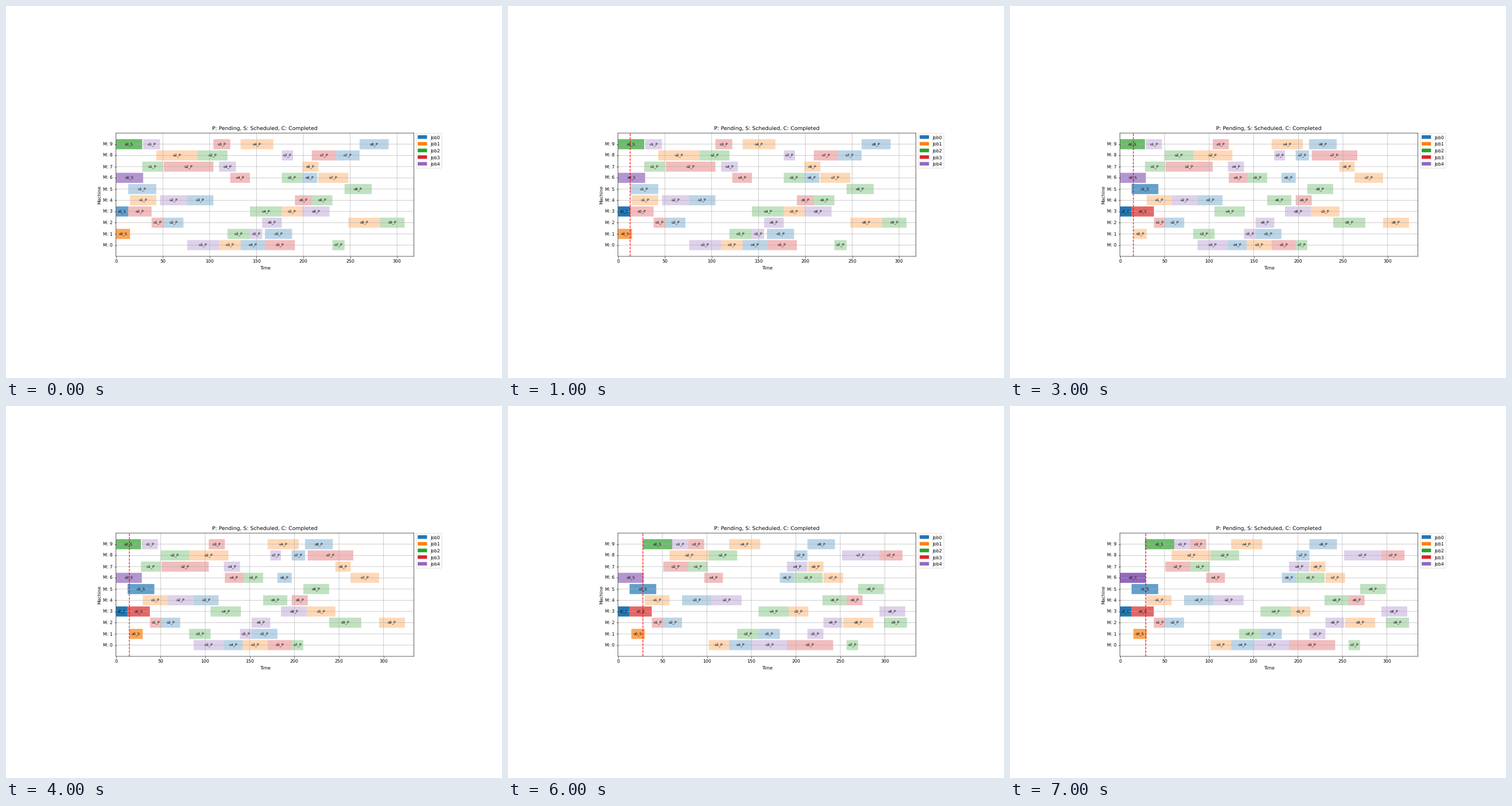
A matplotlib script that plays this animation: 864 px wide and 648 px high, repeating every 8000 ms.

```python
import matplotlib.pyplot as plt
from matplotlib.animation import FuncAnimation
from matplotlib.patches import Patch

W, H = 864, 648
SCALE = 0.775  # chart is drawn smaller than matplotlib's defaults

plt.rcParams.update({
    "font.family": "DejaVu Sans",
    "path.snap": False,
    "text.hinting": "none",
})
for key in ("font.size", "lines.linewidth", "patch.linewidth",
            "axes.linewidth", "grid.linewidth", "axes.titlepad",
            "axes.labelpad", "xtick.major.size", "xtick.major.width",
            "xtick.major.pad", "ytick.major.size", "ytick.major.width",
            "ytick.major.pad"):
    plt.rcParams[key] *= SCALE

COLORS = ["tab:blue", "tab:orange", "tab:green", "tab:red", "tab:purple"]
ALPHA = {"P": 0.3, "S": 0.7, "C": 1.0}

# Operations of each job as machine:duration
JOBS = [[tuple(map(int, op.split(":"))) for op in job.split()] for job in (
    "3:13 5:30 2:21 4:28 0:21 1:24 6:16 8:15 9:31",
    "1:15 4:28 8:44 0:23 9:35 3:22 7:17 6:22 2:29",
    "9:28 7:22 8:32 1:24 3:34 6:22 4:22 0:13 5:29 2:26",
    "3:25 2:13 7:28 9:18 6:21 0:27 4:18 8:26",
    "6:29 9:18 4:29 0:34 7:18 1:13 2:21 8:12 3:29",
)]
# Setup time: digits are machine, previous job, next job
SETUP = {code: time for time, codes in {
    5: "010 001 003 004 140 104 241 410 402 442 404 724 922",
    10: "242 341 601 602 830",
    25: "043 723 803",
    30: "804",
}.items() for code in codes.split()}

EVENTS = [0, 13, 15, 28, 29]
RETRY = {1: 15, 2: 28}  # job: time its first operation fails and restarts


def schedule(now):
    """Dispatch the earliest possible operation; longest job wins a tie."""
    ready, done = [0] * len(JOBS), [0] * len(JOBS)
    free, last = [0] * 10, [None] * 10
    for job, time in RETRY.items():
        if time <= now:
            ready[job] = time
            last[JOBS[job][0][0]] = job

    bars = []
    while True:
        waiting = []
        for job, ops in enumerate(JOBS):
            left = len(ops) - done[job]
            if left:
                machine = ops[done[job]][0]
                start = max(ready[job], free[machine])
                waiting.append((start, -left, job))
        if not waiting:
            return bars
        start, _, job = min(waiting)
        op = done[job]
        machine, length = JOBS[job][op]
        length += SETUP.get(f"{machine}{last[machine]}{job}", 0)
        ready[job] = free[machine] = start + length
        last[machine] = job
        done[job] += 1
        bars.append((machine, job, op, start, length))


def state_of(start, end, now, dispatched):
    if end <= now:
        return "C"
    if start < now or (dispatched and start == now):
        return "S"
    return "P"


fig = plt.figure(figsize=(W / 72, H / 72), dpi=72, facecolor="white")
ax = fig.add_axes([191.6 / W, 211.95 / H, 518.94 / W, 214.83 / H])


def draw(step):
    # Each event replans first, then dispatches one step later
    now = EVENTS[(step + 1) // 2]
    dispatched = step % 2 == 0
    bars = schedule(now)

    ax.clear()
    for machine, job, op, start, length in bars:
        state = state_of(start, start + length, now, dispatched)
        ax.barh(machine, length, left=start, height=0.9,
                color=COLORS[job], alpha=ALPHA[state])
        ax.text(start + length / 2, machine, f"o{op}_{state}",
                ha="center", va="center", fontsize=8 * SCALE)
    if now:
        ax.axvline(now, color="red", linestyle="--")

    end = max(start + length for *_, start, length in bars) + 10
    ax.set_xlim(0, end)
    ax.set_ylim(-1, 10)
    ax.set_xticks(range(0, end, 50))
    ax.set_yticks(range(10), [f"M: {m}" for m in range(10)])
    ax.set_xlabel("Time")
    ax.set_ylabel("Machine")
    ax.set_title("P: Pending, S: Scheduled, C: Completed")
    ax.grid(True)
    ax.legend(handles=[Patch(color=c, label=f"Job{j}")
                       for j, c in enumerate(COLORS)],
              loc="upper left", bbox_to_anchor=(1, 1.015))
    return []


anim = FuncAnimation(fig, draw, frames=2 * len(EVENTS) - 2, interval=1000,
                     init_func=lambda: draw(0), repeat=True, repeat_delay=0)
plt.show()
```
